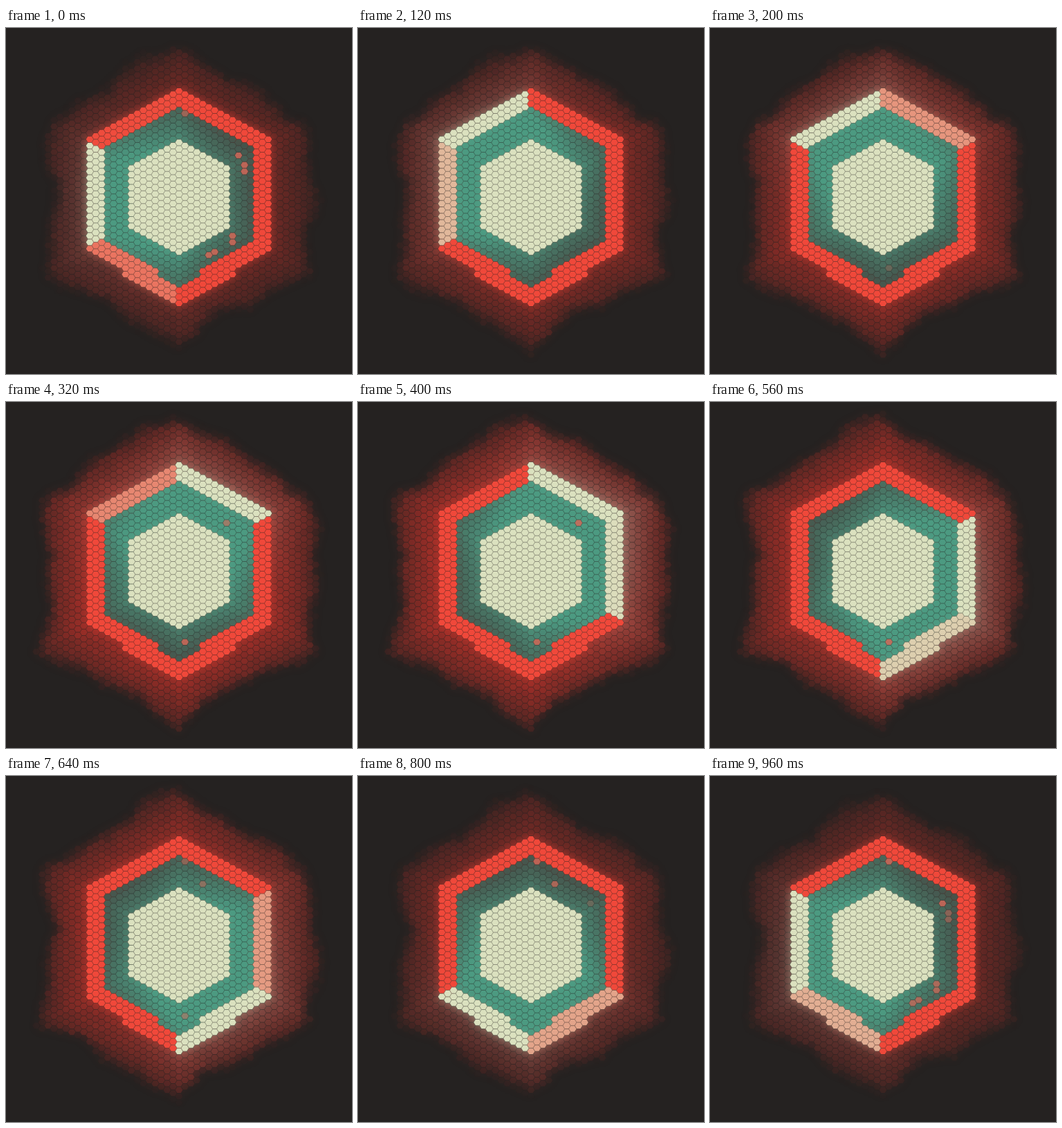
An HTML page with a canvas for the animation above (1000 ms loop, 500 px wide and 500 px high).

```html
<!DOCTYPE html>
<html lang="en">
<head>
<meta charset="utf-8">
<title>Hexagon pulse</title>
<style>
html, body { margin: 0; width: 100%; height: 100%; overflow: hidden; background: #252221; }
canvas { display: block; width: 100vw; height: 100vh; }
</style>
</head>
<body>
<canvas id="stage" width="500" height="500"></canvas>
<script>
const LOOP = 1000, STEP = 40, TAU = Math.PI * 2;
const CX = 250, CY = 243;           // centre of the big hexagon
const COL = 8.6, ROW = 9.3;         // cell pitch
const CORE = 73, WALL_IN = 111, WALL_OUT = 136.9;
const BG = '#252221';
const CREAM = [219, 225, 191], RED = [240, 72, 58], GREEN = [77, 157, 132];
const DIM = [70, 80, 72], EMBER = [190, 50, 42], ASH = [165, 135, 124], SPOT = [216, 104, 88];

// Stray cells in the green band: x, y, start, length (ms)
const SPOTS = [
  [318, 175, 270, 270], [262, 350, 180, 500], [258, 128, 600, 450], [284, 154, 600, 260],
  [336, 186, 780, 320], [345, 210, 920, 150], [344, 200, 920, 150],
  [295, 328, 900, 170], [304, 324, 900, 170], [330, 305, 900, 170]
];

const stage = document.getElementById('stage').getContext('2d');
const layer = document.createElement('canvas');
layer.width = layer.height = 500;
const ink = layer.getContext('2d');

const clamp = (v, a = 0, b = 1) => Math.min(b, Math.max(a, v));
const mod = (v, n) => ((v % n) + n) % n;
const mix = (a, b, k) => a.map((v, i) => v + (b[i] - v) * k);
const hash = (a, b) => mod(Math.sin(a * 127.1 + b * 311.7) * 43758.5453, 1);

function makeCells() {
  const cells = [];
  for (let i = -29; i <= 29; i++) {
    for (let j = -27; j <= 27; j++) {
      const x = CX + i * COL;
      const y = 244.5 + ROW * (j + (i % 2 ? 0 : 0.5));
      const dx = x - CX, dy = y - CY;
      const slant = Math.abs(dx) / 2 + Math.abs(dy) * 0.866;
      const dist = Math.max(Math.abs(dx), slant);
      if (dist > 225) continue;
      const left = dx < 0;
      let side = left ? 0 : 3;
      if (slant > Math.abs(dx)) side = dy < 0 ? (left ? 1 : 2) : (left ? 5 : 4);
      cells.push({ x, y, dist, side, angle: Math.atan2(dy, dx), grain: hash(i, j) });
    }
  }
  return cells;
}
const cells = makeCells();

// Brightness of one side of the wall; sides light up in turn, clockwise from the left
function sideLight(k, t) {
  const u = mod(t - (k - 2) * LOOP / 6, LOOP);
  return clamp(Math.min((u - 165) / 70, (530 - u) / 105));
}

// Light arriving at an angle from all lit sides
function nearLight(angle, lights, power) {
  return lights.reduce((sum, w, k) => {
    const c = 0.5 + 0.5 * Math.cos(angle - Math.PI - k * TAU / 6);
    return sum + w * Math.pow(c, power);
  }, 0);
}

function spotLight(cell, t) {
  let best = 0;
  for (const [x, y, start, length] of SPOTS) {
    if (Math.abs(cell.x - x) > 4.4 || Math.abs(cell.y - y) > 4.7) continue;
    const u = mod(t - start, LOOP);
    best = Math.max(best, clamp(Math.min(u, length - u) / 70));
  }
  return best;
}

function haloEdge(angle, level, phase) {
  const wobble = Math.sin(3 * angle + 1.1) + Math.sin(7 * angle + 2 + Math.sin(phase)) +
    0.8 * Math.sin(13 * angle + Math.cos(phase));
  return 183 + 13 * level + 5 * wobble;
}

function hex(cell, color, alpha) {
  const { x, y } = cell;
  ink.globalAlpha = alpha;
  ink.fillStyle = `rgb(${color.map(Math.round)})`;
  ink.beginPath();
  ink.moveTo(x - 5.3, y);
  ink.lineTo(x - 2.75, y - 4.15);
  ink.lineTo(x + 2.75, y - 4.15);
  ink.lineTo(x + 5.3, y);
  ink.lineTo(x + 2.75, y + 4.15);
  ink.lineTo(x - 2.75, y + 4.15);
  ink.fill();
}

function drawCell(cell, t, lights, level) {
  const { dist, angle } = cell;
  if (dist < CORE) {
    hex(cell, CREAM, 1);
  } else if (dist < WALL_IN) {
    const inner = 1 - (dist - CORE) / (WALL_IN - CORE);
    const lit = 0.7 * nearLight(angle, lights, 1.5) + 0.45 * inner + 0.25 * (level - 0.4);
    const color = mix(DIM, GREEN, clamp(lit));
    hex(cell, mix(color, SPOT, 0.85 * spotLight(cell, t)), 0.95);
  } else if (dist < WALL_OUT) {
    hex(cell, mix(RED, CREAM, lights[cell.side]), 1);
  } else {
    const edge = haloEdge(angle, level, t / LOOP * TAU);
    const fade = clamp((edge + 8 * cell.grain - dist) / 16);
    if (!fade) return;
    const near = clamp(1 - (dist - WALL_OUT) / 55);
    const ash = clamp(nearLight(angle, lights, 7) * near * 0.55);
    const alpha = level * (0.28 + 0.42 * near) * fade * (0.88 + 0.2 * cell.grain);
    hex(cell, mix(EMBER, ASH, ash), clamp(alpha));
  }
}

function draw(t) {
  const lights = [0, 1, 2, 3, 4, 5].map(k => sideLight(k, t));
  const level = 0.72 + 0.26 * Math.cos((t / LOOP - 0.43) * TAU);

  ink.clearRect(0, 0, 500, 500);
  for (const cell of cells) drawCell(cell, t, lights, level);

  stage.globalAlpha = 1;
  stage.fillStyle = BG;
  stage.fillRect(0, 0, 500, 500);
  stage.globalAlpha = 0.68;
  stage.filter = 'blur(7px)';
  stage.drawImage(layer, 0, 0);
  stage.filter = 'none';
  stage.globalAlpha = 1;
  stage.drawImage(layer, 0, 0);
}

const begin = performance.now();
let shown = -1;
function tick() {
  const t = Math.floor(mod(performance.now() - begin, LOOP) / STEP) * STEP;
  if (t !== shown) draw(shown = t);
  requestAnimationFrame(tick);
}
tick();
</script>
</body>
</html>
```
